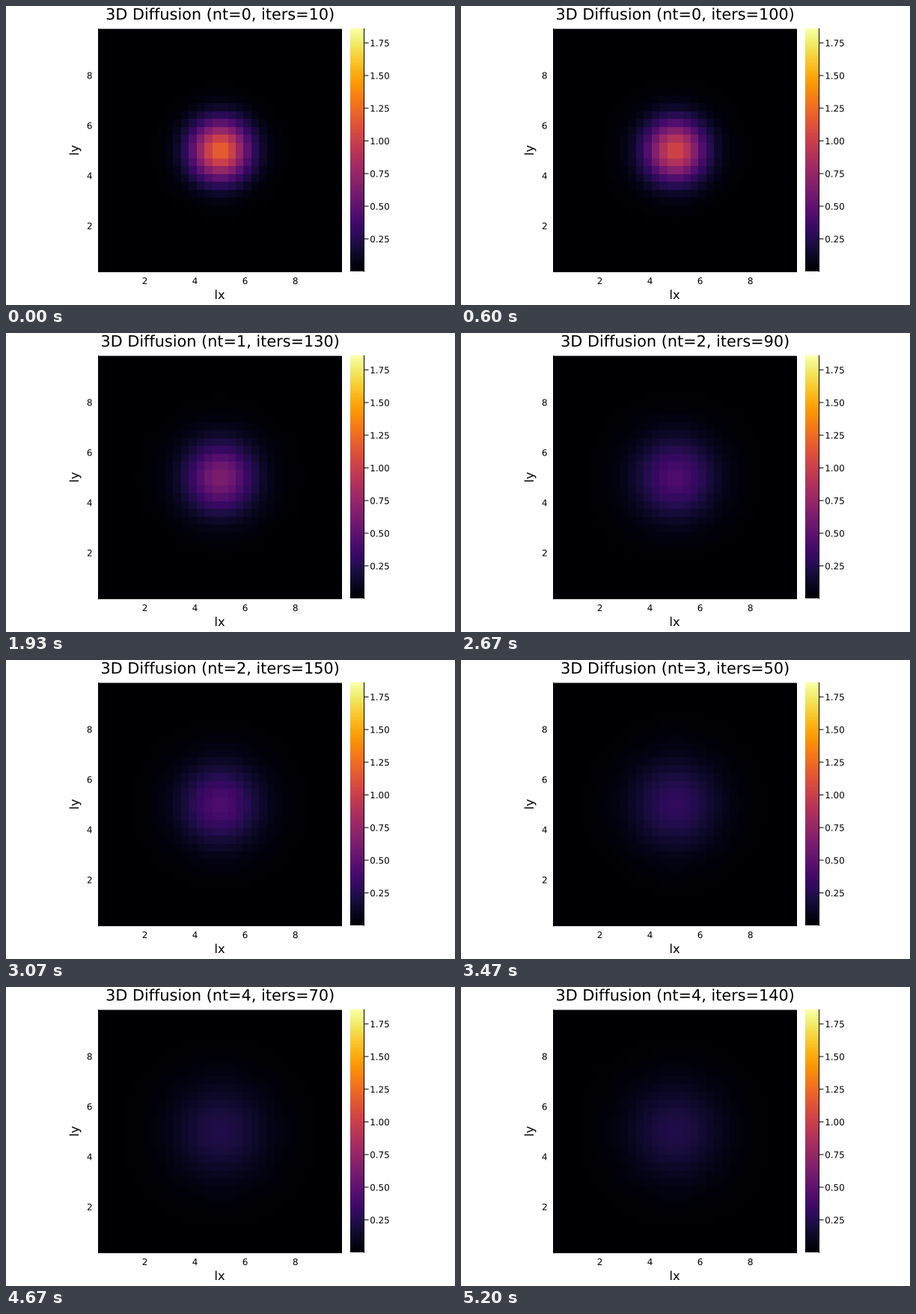
A matplotlib script that plays this animation: 600x400 px, repeating every 5270 ms.

```python
import numpy as np
import matplotlib.pyplot as plt
from matplotlib.animation import FuncAnimation
from matplotlib.patches import PathPatch
from matplotlib.textpath import TextPath
from matplotlib.transforms import Affine2D

plt.rcParams["font.family"] = "DejaVu Sans"

W, H, DPI = 600, 400, 100
LOOP_MS, FRAMES = 5270, 79
PER_STEP, NOUT = 16, 10          # pictures per time step, iterations per picture

# Implicit 3D diffusion, solved by pseudo-time iteration
L, N, D, DT = 10.0, 32, 1.0, 0.2
dx = L / N
dtau = 1 / (6.1 * D / dx**2 + 1 / DT)
edges = np.linspace(0, L, N + 1)
xc = edges[:-1] + dx / 2


def laplacian(u):
    c = u[1:-1, 1:-1, 1:-1]
    return (u[2:, 1:-1, 1:-1] + u[:-2, 1:-1, 1:-1]
            + u[1:-1, 2:, 1:-1] + u[1:-1, :-2, 1:-1]
            + u[1:-1, 1:-1, 2:] + u[1:-1, 1:-1, :-2] - 6 * c) / dx**2


def solve():
    g = np.exp(-(xc - L / 2)**2)
    u = 2 * g[:, None, None] * g[None, :, None] * g[None, None, :]
    top, slices = u.max(), []
    inner = (slice(1, -1),) * 3
    for k in range(FRAMES):
        if k % PER_STEP == 0:
            old = u[inner].copy()
        for _ in range(NOUT):
            u[inner] += dtau * (D * laplacian(u) - (u[inner] - old) / DT)
        slices.append(u[:, :, N // 2].T.copy())
    return slices, top


slices, vmax = solve()

# Layout in pixels, y downwards
LEFT, TOP, SIDE = 123.53, 30.6, 325
BAR_X, BAR_Y, BAR_W = 460.3, 30.3, 18.2
MID_X, MID_Y = LEFT + SIDE / 2, TOP + SIDE / 2
TITLE, GUIDE, TICK = 20.8, 16.35, 11.9

fig = plt.figure(figsize=(W / DPI, H / DPI), dpi=DPI, facecolor="white")
pixels = Affine2D().scale(1 / W, -1 / H).translate(0, 1) + fig.transFigure


def panel(x, y, w, h):
    ax = fig.add_axes([x / W, 1 - (y + h) / H, w / W, h / H])
    ax.set_xticks([])
    ax.set_yticks([])
    ax.spines[:].set_visible(False)
    return ax


def rule(x0, y0, x1, y1):
    fig.add_artist(plt.Line2D([x0, x1], [y0, y1], lw=0.72, color="black",
                              snap=False, transform=pixels))


def glyphs(s, size, center=True):
    path = TextPath((0, 0), s, size=size)
    if center:
        box = path.get_extents()
        path = Affine2D().translate(-(box.x0 + box.x1) / 2, 0).transform_path(path)
    return path


def label(s, x, y, size, center=True, rotation=0):
    place = Affine2D().rotate_deg(rotation).scale(1, -1).translate(x, y)
    return fig.add_artist(PathPatch(glyphs(s, size, center), fc="black", lw=0,
                                    snap=False, transform=place + pixels))


ax = panel(LEFT, TOP, SIDE, SIDE)
ax.patch.set(facecolor="black", snap=False)
mesh = ax.pcolormesh(edges, edges, slices[0], cmap="inferno", vmin=0, vmax=vmax)
ax.set_xlim(xc[0], xc[-1])
ax.set_ylim(xc[0], xc[-1])
rule(LEFT, TOP, LEFT, TOP + SIDE)
rule(LEFT, TOP + SIDE, LEFT + SIDE, TOP + SIDE)

bar = panel(BAR_X, BAR_Y, BAR_W, SIDE)
bar.pcolormesh([0, 1], np.linspace(0, 1, 257), np.linspace(0, 1, 256)[:, None],
               cmap="inferno")
bar.set_xlim(0, 1)
bar.set_ylim(0, 1)
bar_right = BAR_X + BAR_W
rule(bar_right, BAR_Y, bar_right, BAR_Y + SIDE)
for v in np.arange(0.25, 1.8, 0.25):
    y = BAR_Y + SIDE * (1 - v / vmax)
    rule(bar_right, y, bar_right + 5.5, y)
    label(f"{v:.2f}", 486.2, y + 4.6, TICK, center=False)

unit = SIDE / (xc[-1] - xc[0])
for v in (2, 4, 6, 8):
    off = (v - L / 2) * unit
    label(str(v), MID_X + off, 372, TICK)
    label(str(v), 111.7, MID_Y - off + 4.8, TICK)
label("lx", MID_X, 392, GUIDE)
label("ly", 97, MID_Y - 0.6, GUIDE, rotation=90)
title = label("3D", MID_X, 18.2, TITLE)


def draw(k):
    nt, i = divmod(k, PER_STEP)
    mesh.set_array(slices[k])
    text = f"3D Diffusion (nt={nt}, iters={(i + 1) * NOUT})"
    title.set_path(glyphs(text, TITLE))
    return mesh, title


anim = FuncAnimation(fig, draw, frames=FRAMES, interval=LOOP_MS / FRAMES,
                     repeat=True, repeat_delay=0, blit=False)
plt.show()
```
